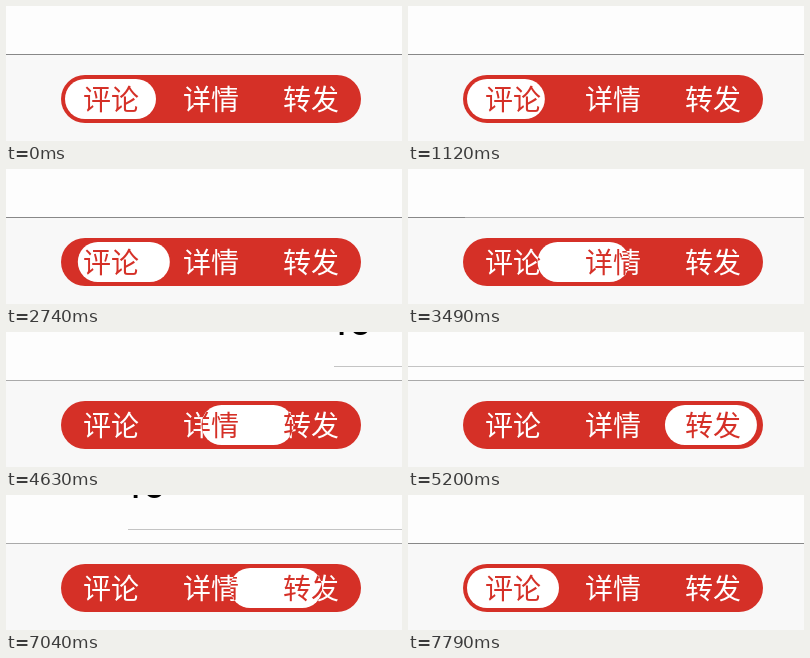
Animation, 396 px wide and 135 px high, one loop 8000 ms. Source, as an HTML page with a canvas:

```html
<!DOCTYPE html>
<html lang="zh-CN">
<head>
<meta charset="utf-8">
<style>
html, body { margin: 0; width: 100%; height: 100%; overflow: hidden; background: #fcfcfc; }
canvas { display: block; }
</style>
</head>
<body>
<canvas width="396" height="135"></canvas>
<script>
const ctx = document.querySelector('canvas').getContext('2d');
const LOOP = 8000;
const RED = '#d53027';
const LABELS = ['评论', '详情', '转发'];
const PAGE = { left: -155, width: 720 };
const TAB = 100;

const glide = u => u * u * (3 - 2 * u);
const settle = u => 1 - (1 - u) ** 2.5;

// Scroll position in pages; values below 0 and above 2 are overscroll
const REST = -.01;
const MOVES = [
  { start: 690, end: 1500, to: -.25, ease: glide },
  { start: 1500, end: 2040, to: 0, ease: settle },
  { start: 2300, end: 4630, to: 1.365, ease: glide },
  { start: 4630, end: 5270, to: 2, ease: glide },
  { start: 5510, end: 6350, to: 2.24, ease: glide },
  { start: 6350, end: 6810, to: 2, ease: settle },
  { start: 6810, end: 7680, to: 0, ease: glide }
];

function scrollAt(time) {
  let position = REST;
  for (const { start, end, to, ease } of MOVES) {
    if (time < start) break;
    position += (to - position) * ease(Math.min(1, (time - start) / (end - start)));
  }
  return position;
}

function rect(x, y, w, h, color) {
  ctx.fillStyle = color;
  ctx.fillRect(x, y, w, h);
}

function capsule(x, y, w, h, color) {
  ctx.beginPath();
  ctx.roundRect(x, y, w, h, h / 2);
  ctx.fillStyle = color;
  ctx.fill();
}

function drawLabels(color) {
  ctx.font = '350 28px "Noto Sans CJK SC", "Noto Sans CJK", sans-serif';
  ctx.textAlign = 'center';
  ctx.fillStyle = color;
  LABELS.forEach((label, i) => ctx.fillText(label, 105 + i * TAB, 104));
}

function drawPages(position) {
  rect(0, 0, 396, 135, '#fdfdfd');
  rect(0, 49, 396, 86, '#f8f8f8');
  for (let i = 0; i < 3; i++) {
    const x = Math.round(PAGE.left + (i - position) * PAGE.width);
    rect(x, 48, PAGE.width, 1, i ? '#aaa' : '#888');
    if (i === 2) {
      rect(x + 26, 34, PAGE.width - 26, 1, '#c4c4c4');
      ctx.font = '42px Roboto, sans-serif';
      ctx.textAlign = 'left';
      ctx.fillStyle = '#000';
      ctx.fillText('40', x + 17, 3);
    }
  }
}

function drawTabs(position) {
  const left = 59 + TAB * Math.max(0, position);
  const right = 151 + TAB * Math.min(2, position);
  capsule(55, 69, 300, 48, RED);
  drawLabels('#fff');
  ctx.save();
  capsule(left, 73, right - left, 40, '#fff');
  ctx.clip();
  drawLabels(RED);
  ctx.restore();
}

function frame() {
  const position = scrollAt(performance.now() % LOOP);
  drawPages(position);
  drawTabs(position);
  requestAnimationFrame(frame);
}
frame();
</script>
</body>
</html>
```
